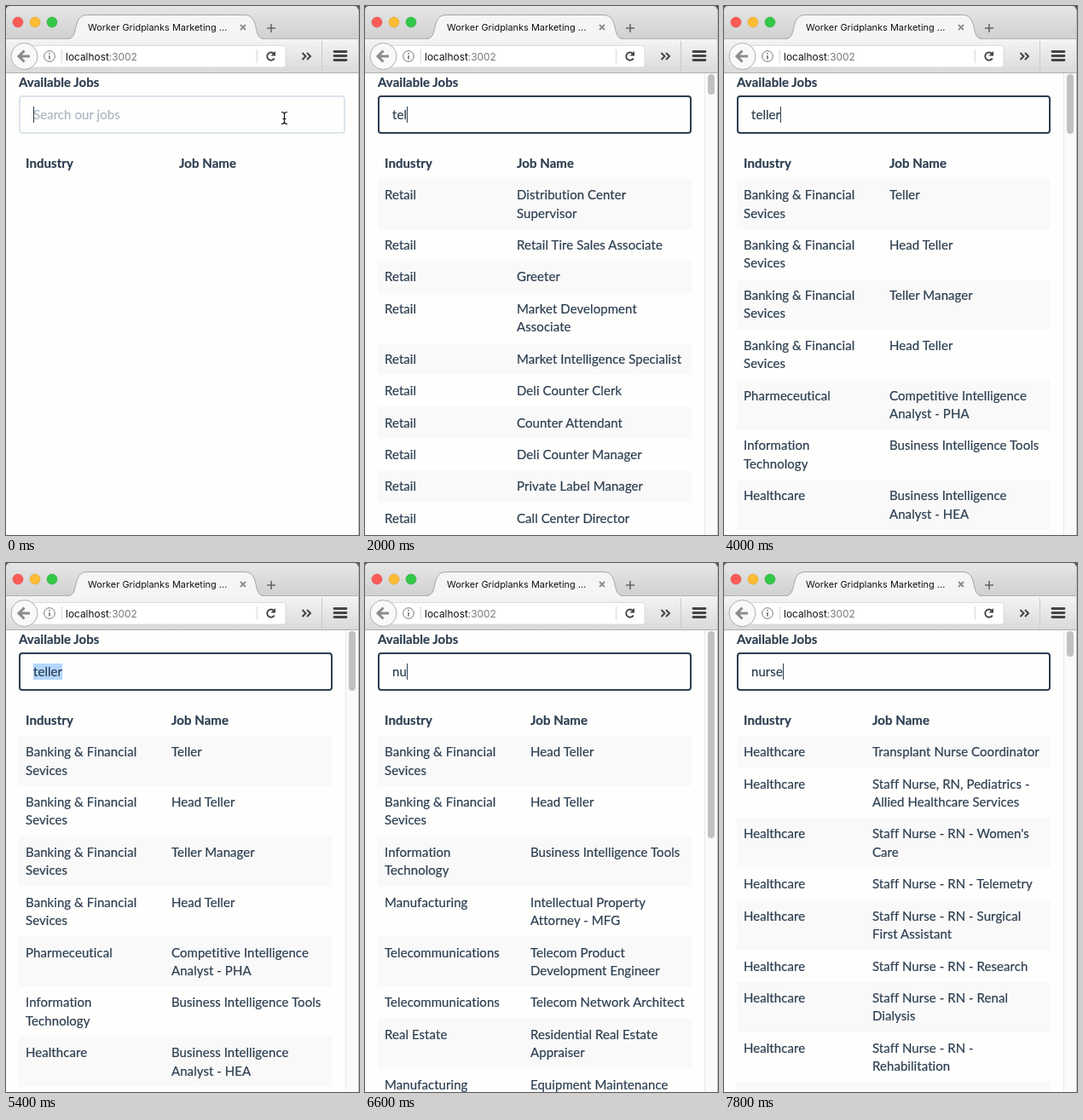
Recreate the animation shown at these times as an HTML page. Size 414 px wide and 621 px high, loop 8 s.

```html
<!DOCTYPE html>
<html lang="en">
<head>
<meta charset="utf-8">
<title>Job search</title>
<style>
html, body { margin: 0; width: 100%; height: 100%; overflow: hidden; background: #fefefd; }
svg { display: block; width: 414px; height: 621px; }
.page { font: 15px Lato, sans-serif; letter-spacing: .06px; font-variant-ligatures: none; color: #2c3e50; }
.page text { fill: currentColor; stroke: currentColor; stroke-width: .2px; }
.bold { font-weight: 700; }
.ui { font-family: Inter, sans-serif; fill: #111; }
</style>
</head>
<body>
<svg viewBox="0 0 414 621" xmlns="http://www.w3.org/2000/svg">
  <defs>
    <linearGradient id="titleBar" x2="0" y2="1">
      <stop stop-color="#e6e6e6"/><stop offset="1" stop-color="#d0d0d0"/>
    </linearGradient>
    <linearGradient id="toolBar" x2="0" y2="1">
      <stop stop-color="#f5f5f5"/><stop offset="1" stop-color="#d9d9d9"/>
    </linearGradient>
  </defs>
  <rect width="414" height="621" fill="#fefefd"/>

  <g class="page">
    <text class="bold" x="15" y="95">Available Jobs</text>
    <rect id="box" x="16" y="106" height="43" rx="3" fill="#fefefd" stroke-width="2"/>
    <rect id="mark" x="32" y="118" height="19" fill="#b3d7fe"/>
    <text id="query" x="32" y="133"></text>
    <rect id="caret" y="118" width="1" height="19" fill="#2c3e50"/>
    <text class="bold" x="23" y="190">Industry</text>
    <text class="bold" id="jobHead" y="190">Job Name</text>
    <g id="rows"></g>
  </g>

  <g id="scroll">
    <rect x="398" y="79" width="15" height="542" fill="#fafafa"/>
    <path d="M398.5 79V621" stroke="#e8e8e8"/>
    <rect id="thumb" x="402" y="80" width="8" rx="4" fill="#c1c1c1"/>
  </g>
  <path id="pointer" d="M323 124.5q3 0 3.5 2q.5-2 3.5-2M326.5 126V137M323 138.5q3 0 3.5-2q.5 2 3.5 2M324.5 132.5h4" fill="none" stroke="#111" stroke-width="1.2"/>

  <g id="browser">
    <path d="M0 0H414V8H0Z" fill="#555"/>
    <path d="M0 39V5Q0 0 5 0H408Q413 0 413 5V39Z" fill="url(#titleBar)"/>
    <rect y="38" width="413" height="41" fill="url(#toolBar)"/>
    <path d="M0 38.5H413" stroke="#b4b4b4"/>
    <path d="M72 39C82 38 80 28 84 18Q87 10.5 95 10.5H280Q288 10.5 291 18C295 28 293 38 303 39Z" fill="#f5f5f5"/>
    <path d="M72 38.5C82 38 80 28 84 18Q87 10.5 95 10.5H280Q288 10.5 291 18C295 28 293 38 303 38.5" fill="none" stroke="#a6a6a6"/>
    <g stroke-width=".6">
      <circle cx="14" cy="19" r="6" fill="#fc5b57" stroke="#df4744"/>
      <circle cx="34" cy="19" r="6" fill="#fdbc34" stroke="#dea032"/>
      <circle cx="54" cy="19" r="6" fill="#33c748" stroke="#27aa35"/>
    </g>
    <text class="ui" x="96" y="29" font-size="10.95">Worker Gridplanks Marketing ...</text>
    <path d="M275 22l6 6m0-6l-6 6" stroke="#8c8c8c" stroke-width="1.8"/>
    <path d="M306 26h10m-5-5v10" stroke="#666" stroke-width="1.6"/>

    <path d="M30 46.5H325Q328 46.5 328 49.5V69Q328 72 325 72H30Z" fill="#fff" stroke="#d2d2d2" stroke-width=".7"/>
    <circle cx="21.5" cy="59" r="15.5" fill="#f9f9f9" stroke="#aeaeae"/>
    <path d="M28 59H16M21.5 52.5L15 59L21.5 65.5" fill="none" stroke="#8b8b8b" stroke-width="3"/>
    <circle cx="51" cy="59" r="6.3" fill="none" stroke="#777"/>
    <path d="M51 55v1.6M51 58v4.5" stroke="#666" stroke-width="1.5"/>
    <path d="M65.5 51V67M294.5 51V67" stroke="#d9d9d9"/>
    <text class="ui" x="70" y="63.5" font-size="11.9">localhost<tspan fill="#777">:3002</tspan></text>
    <path d="M314.3 56A4.6 4.6 0 1 0 314.8 61.5" fill="none" stroke="#444" stroke-width="1.9"/>
    <path d="M316 53v5.5h-5.5z" fill="#444"/>
    <path d="M347.5 55l4 4l-4 4M353 55l4 4l-4 4" fill="none" stroke="#444" stroke-width="2"/>
    <path d="M370.5 41V77" stroke="#cbcbcb"/>
    <path d="M385 53.5H399M385 58.5H399M385 63.5H399" stroke="#444" stroke-width="2.8" stroke-linecap="round"/>
    <path d="M0 78.5H413" stroke="#b0b0b0"/>
    <path d="M413.5 4V621" stroke="#bdbdbd"/>
  </g>
</svg>
<script>
const $ = id => document.getElementById(id);
const LOOP = 8000, TICK = 200, LINE = 21.43, PAD = 8, TOP = 203, ASCENT = 16.15;

const BANK = 'Banking & Financial|Sevices', IT = 'Information|Technology';
const TOOLS = [IT, 'Business Intelligence Tools'];
const HEAD = [BANK, 'Head Teller'];
const TELLERS = [[BANK, 'Teller'], HEAD, [BANK, 'Teller Manager']];
const ANALYST = ['Pharmeceutical', 'Competitive Intelligence|Analyst - PHA'];
const all = (industry, jobs) => jobs.map(job => [industry, job]);

// Each result list: column position, scrollbar thumb height, [industry, job] rows
const lists = {
  empty: { x: 203, thumb: 0, rows: [] },
  retail: { x: 178, thumb: 24, rows: all('Retail', [
    'Distribution Center|Supervisor', 'Retail Tire Sales Associate', 'Greeter',
    'Market Development|Associate', 'Market Intelligence Specialist', 'Deli Counter Clerk',
    'Counter Attendant', 'Deli Counter Manager', 'Private Label Manager', 'Call Center Director']) },
  broad: { x: 189, thumb: 36, rows: [...TELLERS, ANALYST,
    ['Manufacturing', 'Intelligent Manufacturing|Program Manager'], TOOLS,
    [IT, 'Business Intelligence|Developer']] },
  teller: { x: 194, thumb: 70, rows: [...TELLERS, HEAD, ANALYST, TOOLS,
    ['Healthcare', 'Business Intelligence|Analyst - HEA']] },
  mixed: { x: 194, thumb: 243, rows: [HEAD, HEAD, TOOLS,
    ['Manufacturing', 'Intellectual Property|Attorney - MFG'],
    ['Telecommunications', 'Telecom Product|Development Engineer'],
    ['Telecommunications', 'Telecom Network Architect'],
    ['Real Estate', 'Residential Real Estate|Appraiser'],
    ['Manufacturing', 'Equipment Maintenance|Technician']] },
  nurse: { x: 174, thumb: 30, rows: all('Healthcare', [
    'Transplant Nurse Coordinator', 'Staff Nurse, RN, Pediatrics -|Allied Healthcare Services',
    "Staff Nurse - RN - Women's|Care", 'Staff Nurse - RN - Telemetry',
    'Staff Nurse - RN - Surgical|First Assistant', 'Staff Nurse - RN - Research',
    'Staff Nurse - RN - Renal|Dialysis', 'Staff Nurse - RN -|Rehabilitation',
    'Staff Nurse - RN - Oncology']) }
};

const typing = [[0, ''], [1400, 't'], [1800, 'te'], [2000, 'tel'], [2200, 'tell'], [2400, 'telle'],
  [2600, 'teller'], [6400, 'n'], [6600, 'nu'], [6800, 'nur'], [7200, 'nurs'], [7400, 'nurse']];
const results = [[0, 'empty'], [1600, 'retail'], [2400, 'broad'], [3000, 'teller'],
  [6600, 'mixed'], [7000, 'nurse']];
const at = (track, t) => track.findLast(step => step[0] <= t);

const esc = s => s.replace(/&/g, '&amp;');
const cell = (text, x, y) => text.split('|').map((line, i) =>
  `<text x="${x}" y="${Math.round(y + PAD + ASCENT + i * LINE)}">${esc(line)}</text>`).join('');

function tableMarkup({ x, rows }) {
  let y = TOP;
  return rows.map(([industry, job], i) => {
    const lines = Math.max(industry.split('|').length, job.split('|').length);
    const h = lines * LINE + 2 * PAD;
    const stripe = i % 2 ? '' : `<rect x="15" y="${y}" width="368" height="${h}" fill="#f9f9f9"/>`;
    const out = stripe + cell(industry, 23, y) + cell(job, x, y);
    y += h;
    return out;
  }).join('');
}

const set = (id, attrs) => {
  for (const k in attrs) $(id).setAttribute(k, attrs[k]);
};
const show = (id, on) => set(id, { visibility: on ? 'visible' : 'hidden' });

let shown;
function showList(name) {
  if (name === shown) return;
  shown = name;
  const list = lists[name];
  $('rows').innerHTML = tableMarkup(list);
  set('jobHead', { x: list.x });
  set('thumb', { height: list.thumb });
  set('box', { width: list.thumb ? 366 : 381 });
  show('scroll', list.thumb > 0);
}

function draw(t) {
  const [keyTime, text] = at(typing, t);
  const selected = t >= 5200 && t < 6400;
  showList(at(results, t)[1]);
  set('box', { stroke: t < 200 ? '#dce4ec' : '#2c3e50' });
  $('query').textContent = text || 'Search our jobs';
  set('query', { color: text ? '#2c3e50' : '#acb6c0' });
  const width = text ? $('query').getComputedTextLength() : 0;
  set('mark', { width });
  set('caret', { x: Math.round(32 + width) });
  show('mark', selected);
  show('caret', !selected && (t - keyTime) % 1000 < 500);
  show('pointer', t < 1400);
}

function frame(now) {
  draw(Math.floor(now % LOOP / TICK) * TICK);
  requestAnimationFrame(frame);
}
draw(0);
requestAnimationFrame(frame);
</script>
</body>
</html>
```
